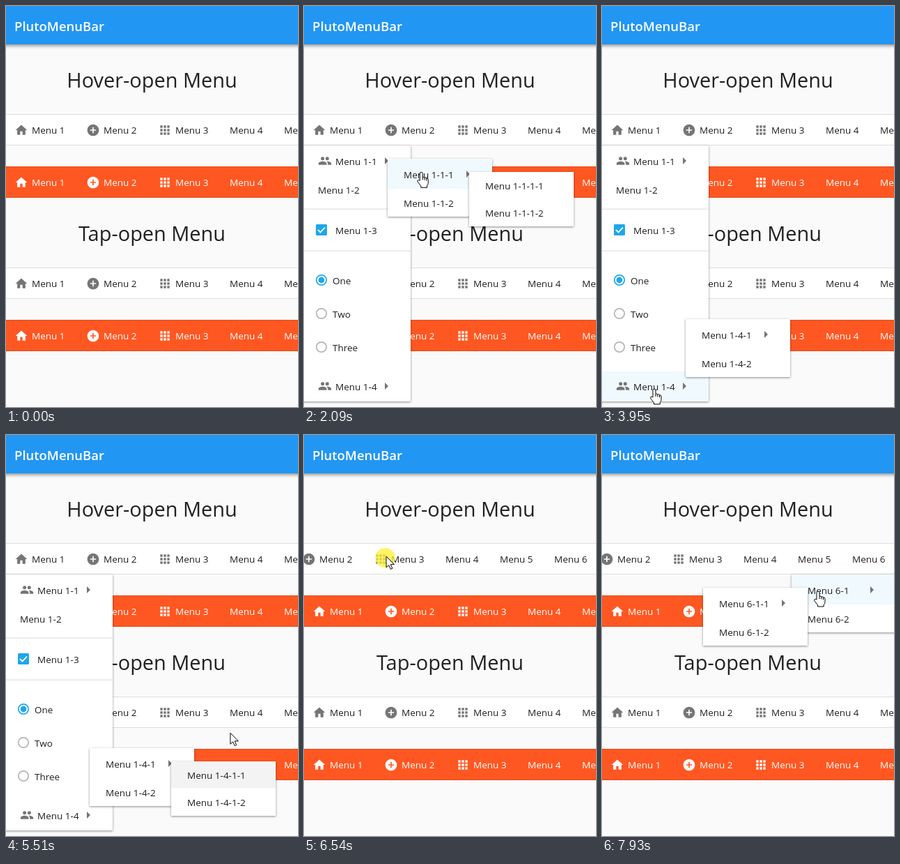
Animation, 419 px wide and 575 px high, one loop 8 s. Source, as an HTML page with a canvas:

```html
<!DOCTYPE html>
<html lang="en">
<head>
<meta charset="utf-8">
<title>PlutoMenuBar</title>
<style>
html, body { margin: 0; width: 100%; height: 100%; overflow: hidden; background: #fafafa; }
canvas { display: block; width: 419px; height: 575px; }
</style>
</head>
<body>
<canvas id="stage"></canvas>
<script>
const W = 419, H = 575, LOOP = 8000;
const canvas = document.getElementById('stage');
const ctx = canvas.getContext('2d');
const dpr = window.devicePixelRatio || 1;
canvas.width = W * dpr;
canvas.height = H * dpr;

const FONT = '"Open Sans", "Noto Sans", sans-serif';
const INK = '#1f1f1f', GREY = '#757575', BLUE = '#1ea7ec';
const ORANGE = '#ff5722', PARENT_HOVER = '#f0f9fe', LEAF_HOVER = '#f3f3f3';

// Icons on a 24-unit grid
const ICONS = {
  home: new Path2D('M10 20v-6h4v6h5v-8h3L12 3 2 12h3v8z'),
  add: new Path2D('M12 2C6.48 2 2 6.48 2 12s4.48 10 10 10 10-4.48 10-10S17.52 2 12 2zm5 11h-4v4h-2v-4H7v-2h4V7h2v4h4z'),
  apps: new Path2D(),
  people: new Path2D('M16 11a3 3 0 1 0 0-6 3 3 0 0 0 0 6zM8 11a3 3 0 1 0 0-6 3 3 0 0 0 0 6z' +
    'm0 2c-2.33 0-7 1.17-7 3.5V19h14v-2.5c0-2.33-4.67-3.5-7-3.5z' +
    'm8 0c-.29 0-.62.02-.97.05 1.16.84 1.97 1.97 1.97 3.45V19h6v-2.5c0-2.33-4.67-3.5-7-3.5z')
};
for (let i = 0; i < 9; i++) ICONS.apps.rect(4 + i % 3 * 6, 4 + Math.floor(i / 3) * 6, 4, 4);

const HAND = new Path2D('M-2 12V2a2 2 0 0 1 4 0V7.5Q3.5 6.3 4.8 8 6.5 7 7.5 8.8 10 8.5 10 11' +
  'V15.5Q10 17.5 8.2 19.5V22H-.5V19.8L-4.6 14.6Q-6 12.6-5 11.6-3.6 10.6-2 12z');
const ARROW = new Path2D('M0 0V16L3.7 12.6 6.3 18.4 8.8 17.3 6.3 11.6H11.5z');

const BAR_ITEMS = [['Menu 1', 37, 'home'], ['Menu 2', 140, 'add'], ['Menu 3', 243, 'apps'],
  ['Menu 4', 321], ['Menu 5', 399], ['Menu 6', 477]];

// A submenu of two rows; the first row may lead to another level
function pair(prefix, x, y, nested, open, close, hover) {
  const step = nested ? 41 : 39, first = nested ? 23 : 20;
  return {
    x, y, w: 150, h: nested ? 83 : 78, open, close, grow: 130,
    rows: [
      { text: prefix + '-1', x: x + 23, y: y + first, arrow: nested && x + 113, hover },
      { text: prefix + '-2', x: x + 23, y: y + first + step }
    ]
  };
}

const MENUS = [
  {
    x: -3, y: 200, w: 156, h: 367, open: 770, close: 5530, grow: 300,
    dividers: [291, 351],
    rows: [
      { text: 'Menu 1-1', x: 45, y: 223, icon: 'people', arrow: 116, hover: [1560, 2000] },
      { text: 'Menu 1-2', x: 20, y: 264 },
      { text: 'Menu 1-3', x: 45, y: 322, check: true },
      { text: 'One', x: 41, y: 394, radio: 'on' },
      { text: 'Two', x: 41, y: 442, radio: 'off' },
      { text: 'Three', x: 41, y: 490, radio: 'off' },
      { text: 'Menu 1-4', x: 45, y: 546, icon: 'people', arrow: 116, hover: [3680, 4300] }
    ]
  },
  pair('Menu 1-1', 120, 219, true, 1490, 2900, [2000, 2480]),
  pair('Menu 1-1-1', 237, 238, false, 1955, 2780, [2550, 2780]),
  pair('Menu 1-4', 120, 449, true, 3800, 5530, [4290, 5110]),
  pair('Menu 1-4-1', 237, 468, false, 4630, 5530, [5180, 5600]),
  pair('Menu 6', 272, 200, true, 7090, 9000, [7520, 9000]),
  pair('Menu 6-1', 145, 219, true, 7520, 9000)
];

// Pointer path: time, x, y
const POINTER = [[310, 421, 116], [760, 60, 160], [1080, 31, 167], [1150, 27, 175],
  [1450, 27, 175], [1600, 36, 210], [1930, 36, 210], [2080, 167, 238], [2150, 175, 240],
  [2400, 175, 240], [2550, 314, 266], [2670, 314, 266], [2900, 130, 262], [3080, 50, 235],
  [3460, 31, 497], [3510, 31, 497], [3900, 75, 549], [4130, 75, 549], [4360, 161, 499],
  [4540, 161, 499], [4700, 186, 472], [5010, 186, 472], [5180, 315, 497], [5450, 315, 497],
  [5510, 322, 428], [5860, 295, 178], [6100, 295, 178], [6520, 118, 174], [6570, 118, 174],
  [6890, 375, 176], [7100, 386, 172], [7420, 386, 172], [7600, 355, 225], [7820, 355, 225],
  [7920, 310, 224], [8000, 310, 224]];

const ramp = (t, start, length) => Math.max(0, Math.min(1, (t - start) / length));
const within = (t, [a, b]) => t >= a && t < b;

function pointerAt(t) {
  const i = POINTER.findIndex(key => key[0] > t);
  const [t0, x0, y0] = POINTER[i - 1], [t1, x1, y1] = POINTER[i];
  const k = (t - t0) / (t1 - t0);
  return [x0 + (x1 - x0) * k, y0 + (y1 - y0) * k];
}

function rect(x, y, w, h, color) {
  ctx.fillStyle = color;
  ctx.fillRect(x, y, w, h);
}

function label(text, x, baseline, color = INK, size = 13.5, weight = 400, align = 'left') {
  ctx.font = `${weight} ${size}px ${FONT}`;
  ctx.textAlign = align;
  ctx.fillStyle = color;
  ctx.fillText(text, x, baseline);
}

function icon(name, cx, cy, color) {
  ctx.save();
  ctx.translate(cx - 10, cy - 10);
  ctx.scale(20 / 24, 20 / 24);
  ctx.fillStyle = color;
  ctx.fill(ICONS[name]);
  ctx.restore();
}

function shadowRect(x, y, w, h, color, alpha, blur, dy) {
  ctx.save();
  ctx.shadowColor = `rgba(0,0,0,${alpha})`;
  ctx.shadowBlur = blur * dpr;
  ctx.shadowOffsetY = dy * dpr;
  rect(x, y, w, h, color);
  ctx.restore();
}

function bar(y, filled, scroll = 0) {
  rect(0, y, W, 45, filled ? ORANGE : '#fff');
  rect(0, y, W, 1, 'rgba(0,0,0,.13)');
  rect(0, y + 44, W, 1, 'rgba(0,0,0,.13)');
  for (const [text, x, name] of BAR_ITEMS) {
    label(text, x - scroll, y + 28, filled ? '#fff' : INK);
    if (name) icon(name, x - 15 - scroll, y + 23, filled ? '#fff' : GREY);
  }
}

function circle(x, y, r, color, line) {
  ctx.beginPath();
  ctx.arc(x, y, r, 0, Math.PI * 2);
  ctx.lineWidth = line || 1;
  ctx.fillStyle = ctx.strokeStyle = color;
  line ? ctx.stroke() : ctx.fill();
}

function checkbox(x, y) {
  ctx.beginPath();
  ctx.roundRect(x, y, 16, 16, 1.5);
  ctx.fillStyle = BLUE;
  ctx.fill();
  ctx.beginPath();
  ctx.moveTo(x + 3, y + 8);
  ctx.lineTo(x + 6.5, y + 11.5);
  ctx.lineTo(x + 13, y + 4.7);
  ctx.strokeStyle = '#fff';
  ctx.lineWidth = 1.8;
  ctx.stroke();
}

function row(menu, item, t) {
  const { text, x, y, arrow } = item;
  if (item.hover && within(t, item.hover)) {
    const half = arrow ? 21.5 : 19.5;
    rect(menu.x, y - half - 1, menu.w, half * 2, arrow ? PARENT_HOVER : LEAF_HOVER);
  }
  label(text, x, y + 5);
  if (item.icon) icon(item.icon, 30, y - 1, GREY);
  if (item.check) checkbox(17, y - 9);
  if (item.radio) {
    const on = item.radio === 'on';
    circle(25, y - 1, 7.2, on ? BLUE : '#b4b4b4', 1.7);
    if (on) circle(25, y - 1, 4.4, BLUE);
  }
  if (arrow) {
    ctx.beginPath();
    ctx.moveTo(arrow, y - 6);
    ctx.lineTo(arrow + 5, y - 1);
    ctx.lineTo(arrow, y + 4);
    ctx.fillStyle = GREY;
    ctx.fill();
  }
}

function dropdown(menu, t) {
  const p = Math.min(ramp(t, menu.open, menu.grow), 1 - ramp(t, menu.close, 240));
  if (p <= 0) return;
  const { x, y, w } = menu, h = menu.h * p;
  ctx.save();
  ctx.globalAlpha = Math.min(1, p * 2);
  shadowRect(x, y, w, h, '#fff', 0.45, 3, 1);
  ctx.beginPath();
  ctx.rect(x, y, w, h);
  ctx.clip();
  for (const d of menu.dividers || []) rect(x, d - 0.5, w, 1.5, '#e6e6e6');
  for (const item of menu.rows) row(menu, item, t);
  ctx.restore();
}

function pointer(t) {
  if (t < 310) return;
  const [x, y] = pointerAt(t);
  if (within(t, [6110, 6590])) circle(x - 1.5, y + 2, 14, 'rgba(255,240,50,.75)');
  const shape = t < 740 || within(t, [5480, 6860]) ? ARROW : HAND;
  ctx.save();
  ctx.translate(x, y);
  ctx.fillStyle = '#fff';
  ctx.strokeStyle = '#000';
  ctx.lineWidth = 1;
  ctx.lineJoin = 'round';
  ctx.fill(shape);
  ctx.stroke(shape);
  if (shape === HAND) {
    ctx.beginPath();
    for (const [fx, fy] of [[2, 7.5], [4.8, 8], [7.5, 8.8]]) {
      ctx.moveTo(fx, fy);
      ctx.lineTo(fx, fy + 3.5);
    }
    ctx.stroke();
  }
  ctx.restore();
}

function scrollAt(t) {
  if (t < 6110) return 0;
  return t > 6520 ? 118 : Math.min(118, 295 - pointerAt(t)[0]);
}

function draw(t) {
  ctx.setTransform(dpr, 0, 0, dpr, 0, 0);
  rect(0, 0, W, H, '#fafafa');
  shadowRect(-10, -10, W + 20, 65, '#2196f3', 0.45, 5, 2);
  label('PlutoMenuBar', 12, 36, '#fff', 18.5, 600);
  label('Hover-open Menu', W / 2, 117, '#212121', 28.9, 400, 'center');
  label('Tap-open Menu', W / 2, 337, '#212121', 28.9, 400, 'center');
  bar(155, false, scrollAt(t));
  bar(230, true);
  bar(375, false);
  bar(450, true);
  for (const menu of MENUS) dropdown(menu, t);
  pointer(t);
}

const start = performance.now();
function frame() {
  draw((performance.now() - start) % LOOP);
  requestAnimationFrame(frame);
}
frame();
</script>
</body>
</html>
```
